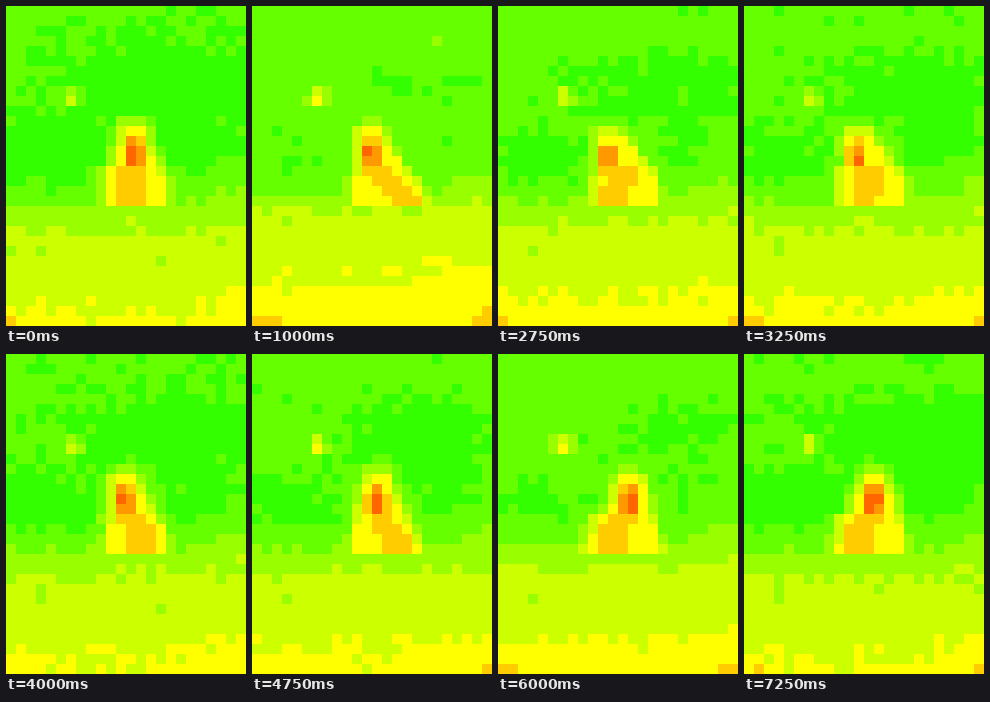
These frames come from a looping animation (240 by 320 pixels, 7500 ms). A matplotlib script:

```python
import numpy as np
import matplotlib.pyplot as plt
from matplotlib.animation import FuncAnimation

COLS, ROWS = 24, 32
FRAMES, STEP_MS = 30, 250
X, Y = np.meshgrid(np.arange(COLS) + 0.5, np.arange(ROWS) + 0.5)

# green -> yellow -> red, one colour per temperature level
PALETTE = np.array([[min(k + 1, 5) * 51, min(9 - k, 5) * 51, 0]
                    for k in range(8)], dtype=np.uint8)


def bump(x, y, sx, sy):
    return np.exp(-0.5 * (((X - x) / sx) ** 2 + ((Y - y) / sy) ** 2))


def make_room():
    # wall, skirting, then floor getting warmer towards the viewer
    t = np.interp(Y - 0.5, [16, 18, 20, 23, 27, 28, 31],
                  [1.3, 1.55, 2.7, 3.4, 3.57, 3.85, 4.25])
    # cool patches on the wall
    t -= 0.6 * bump(17, 7.8, 6.5, 2.8)
    t -= 0.6 * bump(4, 15, 4.5, 2.3)
    t -= 0.5 * bump(18.5, 14.5, 3.5, 2.3)
    # warmth around the person, at the right edge and in the lower corners
    t += 0.5 * bump(13.5, 15, 1.9, 2.5)
    t += 0.8 * bump(23.5, 18, 3.5, 1.8)
    t += 0.35 * bump(23.5, 28.5, 4, 1.8)
    for x in (0.5, 23.5):
        t += 0.75 * bump(x, 31.5, 1.5, 0.9)
    # lamp, warm fleck and cool fleck
    t += 4.1 * bump(6.55, 9.1, 0.65, 0.5)
    t += 1.0 * bump(18.5, 3.1, 0.4, 0.5)
    t -= 0.55 * bump(3.5, 24.5, 0.4, 0.6)
    return t + np.random.default_rng(7).normal(0, 0.08, t.shape)


ROOM = make_room()


def person(i):
    # the head sways once per loop, the weight shifts between legs twice
    turn = 2 * np.pi / FRAMES
    sway = np.cos(turn * (i - 25))
    head_x = 12.2 + 1.1 * sway
    leg_x = 13 + 2 * np.cos(2 * turn * (i - 4)) - 0.8 * sway
    crouch = 0.6 * max(0, -sway) ** 3

    # outline
    centre = np.interp(Y, [13, 17], [head_x, 13])
    half = np.interp(Y, [12, 14, 19], [0.6, 1.3, 2.8])
    left = np.maximum(centre - half, 10.1)
    dx = np.maximum(np.maximum(left - X, X - centre - half), 0)
    dy = np.maximum(np.maximum(12.4 + crouch - Y, Y - 19.7), 0)
    t = 4.5 - 2.3 * np.hypot(dx, dy)

    # warm torso running down into the leading leg
    middle = np.interp(Y, [16.5, 19.5], [12.5 + 0.2 * (leg_x - 13), leg_x])
    core = 5.45 - 1.6 * np.maximum(np.abs(X - middle) - 1.15, 0)
    t = np.where((Y > 16) & (Y < 20), np.maximum(t, core), t)

    # hot head
    head = (7.55 + 0.35 * sway - 1.9 * (X - head_x) ** 2
            - 0.67 * (Y - 14.75 - crouch) ** 2)
    return np.where(X > 10, np.maximum(t, head), t)


def levels(i):
    # slow drift of the sensor's overall reading
    drift = np.interp(i, [0, 4, 11, 16, 24, 30],
                      [-0.2, 0.3, 0.02, -0.12, 0.14, -0.2])
    rng = np.random.default_rng(100 + i)
    noise = rng.normal(0, 0.09, ROOM.shape) + rng.normal(0, 0.04, (ROWS, 1))
    t = np.maximum(ROOM + drift, person(i)) + noise
    return np.clip(np.floor(t), 0, 7).astype(int)


fig = plt.figure(figsize=(2.4, 3.2), dpi=100)
ax = fig.add_axes([0, 0, 1, 1])
ax.axis("off")
image = ax.imshow(PALETTE[levels(0)], interpolation="nearest", aspect="auto")


def update(i):
    image.set_data(PALETTE[levels(i)])
    return [image]


anim = FuncAnimation(fig, update, frames=FRAMES, interval=STEP_MS,
                     repeat=True, repeat_delay=0, blit=False)
plt.show()
```
